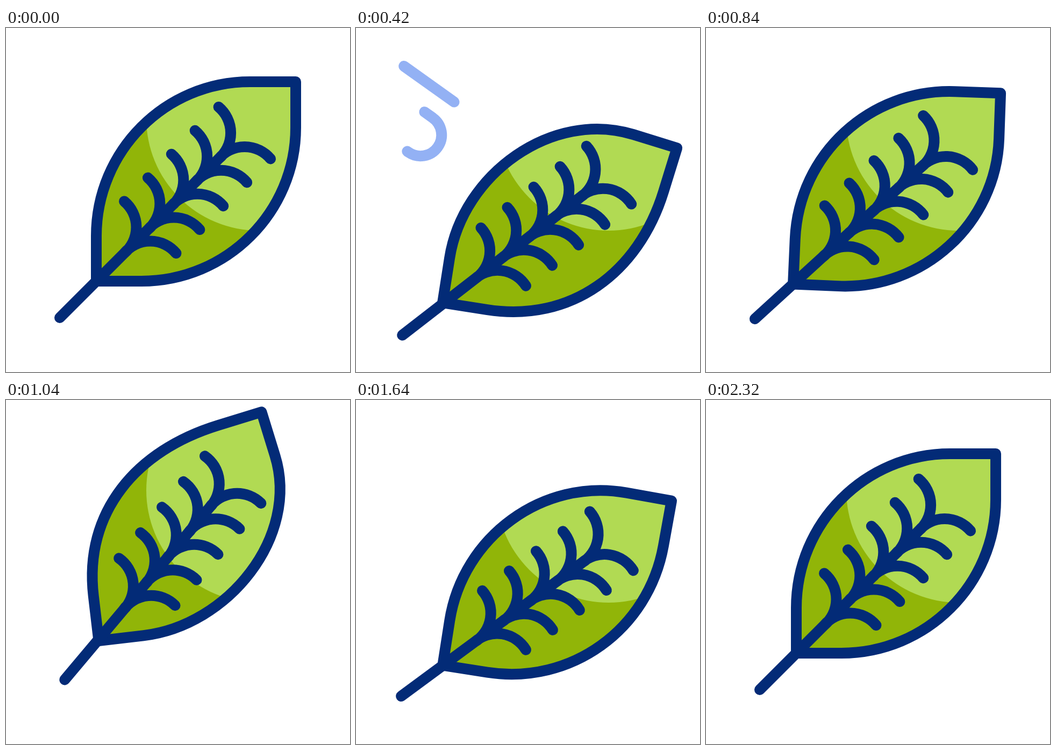
An HTML page with a canvas that plays this animation: 640x640 px, repeating every 3600 ms.

```html
<!DOCTYPE html>
<html lang="en">
<head>
<meta charset="utf-8">
<title>Leaf in the wind</title>
<style>
html, body { margin: 0; width: 100%; height: 100%; overflow: hidden; background: #fff; }
canvas { display: block; width: 640px; height: 640px; }
</style>
</head>
<body>
<canvas id="stage" width="640" height="640"></canvas>
<script>
const ctx = document.getElementById('stage').getContext('2d');
const LOOP = 3600, DEG = Math.PI / 180;
const NAVY = '#032b77', GREEN = '#91b508', LIGHT = '#b1da53', WIND = '#93b1f4';

// Eased keys: [time, value] pairs
const sway = {
  x: [[0, 0], [562, 14.2], [1100, -11.3], [1650, 14.3], [2333, 0]],
  y: [[0, 0], [566, 74], [1085, -39], [1615, 47.5], [2290, 0]],
  turn: [[0, 0], [606, 9.3], [1115, -5.8], [1700, 9], [2333, 0]],
  bend: [[0, 0], [555, 4.85], [1110, -4.85], [1660, 0.7], [2150, 0]]
};

function ease(t, from, to) {
  const k = Math.min(1, Math.max(0, (t - from) / (to - from)));
  return k * k * (3 - 2 * k);
}

function track(keys, t) {
  let v = keys[0][1];
  for (let i = 1; i < keys.length; i++) {
    v += (keys[i][1] - keys[i - 1][1]) * ease(t, keys[i - 1][0], keys[i][0]);
  }
  return v;
}

function rotate([x, y], deg) {
  const c = Math.cos(deg * DEG), s = Math.sin(deg * DEG);
  return [x * c - y * s, x * s + y * c];
}

// The tip swings wide and the base gives way a little against it
function leafPath(bend) {
  const at = (o, p, deg) => {
    const r = rotate(p, deg);
    return [o[0] + r[0], o[1] + r[1]];
  };
  const reach = 371 * (1 - 0.001 * Math.abs(bend));
  const base = [168 - 0.3 * bend, 471 - 0.3 * bend];
  const tip = at([168, 471], [reach, -reach], bend);
  const low = (x, y) => at(base, [x, y], bend * 0.4);
  const high = (x, y) => at(tip, [x, y], bend * (bend > 0 ? 2.4 : 2.75));
  const p = new Path2D();
  p.moveTo(...base);
  p.lineTo(...low(0, -84));
  p.bezierCurveTo(...low(0, -242), ...high(-243, 0), ...high(-85, 0));
  p.lineTo(...tip);
  p.lineTo(...high(0, 85));
  p.bezierCurveTo(...high(0, 243), ...low(242, 0), ...low(84, 0));
  p.closePath();
  return p;
}

const veins = new Path2D();
veins.moveTo(100, 539);
veins.lineTo(395.5, 243.5);
for (let i = 0; i < 5; i++) {
  const x = 220 + 43.9 * i, y = 322.5 - 43.9 * i;
  veins.addPath(new Path2D(
    `M${x} ${y}a63 63 0 0 1 0 96.5a63 63 0 0 1 96.5 0`));
}

const gust = new Path2D('M78 63L200 150');
const curl = new Path2D('M96 134L142.7 167');
curl.arc(120, 199, 39.2, -54.6 * DEG, 129 * DEG);

function drawWind(path, length, start, end) {
  if (end <= start) return;
  ctx.strokeStyle = WIND;
  ctx.setLineDash([(end - start) * length, 1000]);
  ctx.lineDashOffset = -start * length;
  ctx.stroke(path);
  ctx.setLineDash([]);
}

function draw(t) {
  ctx.setTransform(1, 0, 0, 1, 0, 0);
  ctx.fillStyle = '#fff';
  ctx.fillRect(0, 0, 640, 640);
  ctx.lineWidth = 20;
  ctx.lineCap = ctx.lineJoin = 'round';

  drawWind(gust, 149.8, ease(t, 335, 795), ease(t, 116, 516));
  drawWind(curl, 182.7, ease(t, 285, 745), ease(t, 16, 416));

  const leaf = leafPath(track(sway.bend, t));
  ctx.translate(320 + track(sway.x, t), 320 + track(sway.y, t));
  ctx.rotate(track(sway.turn, t) * DEG);
  ctx.translate(-320, -320);
  ctx.fillStyle = GREEN;
  ctx.fill(leaf);

  // The light spot keeps its place on the stage
  ctx.save();
  ctx.clip(leaf);
  ctx.setTransform(1, 0, 0, 1, 0, 0);
  ctx.fillStyle = LIGHT;
  ctx.beginPath();
  ctx.arc(470, 168, 209, 0, 2 * Math.PI);
  ctx.fill();
  ctx.restore();

  ctx.strokeStyle = NAVY;
  ctx.stroke(leaf);
  ctx.stroke(veins);
}

const begin = performance.now();
function tick() {
  draw((performance.now() - begin) % LOOP);
  requestAnimationFrame(tick);
}
tick();
</script>
</body>
</html>
```
